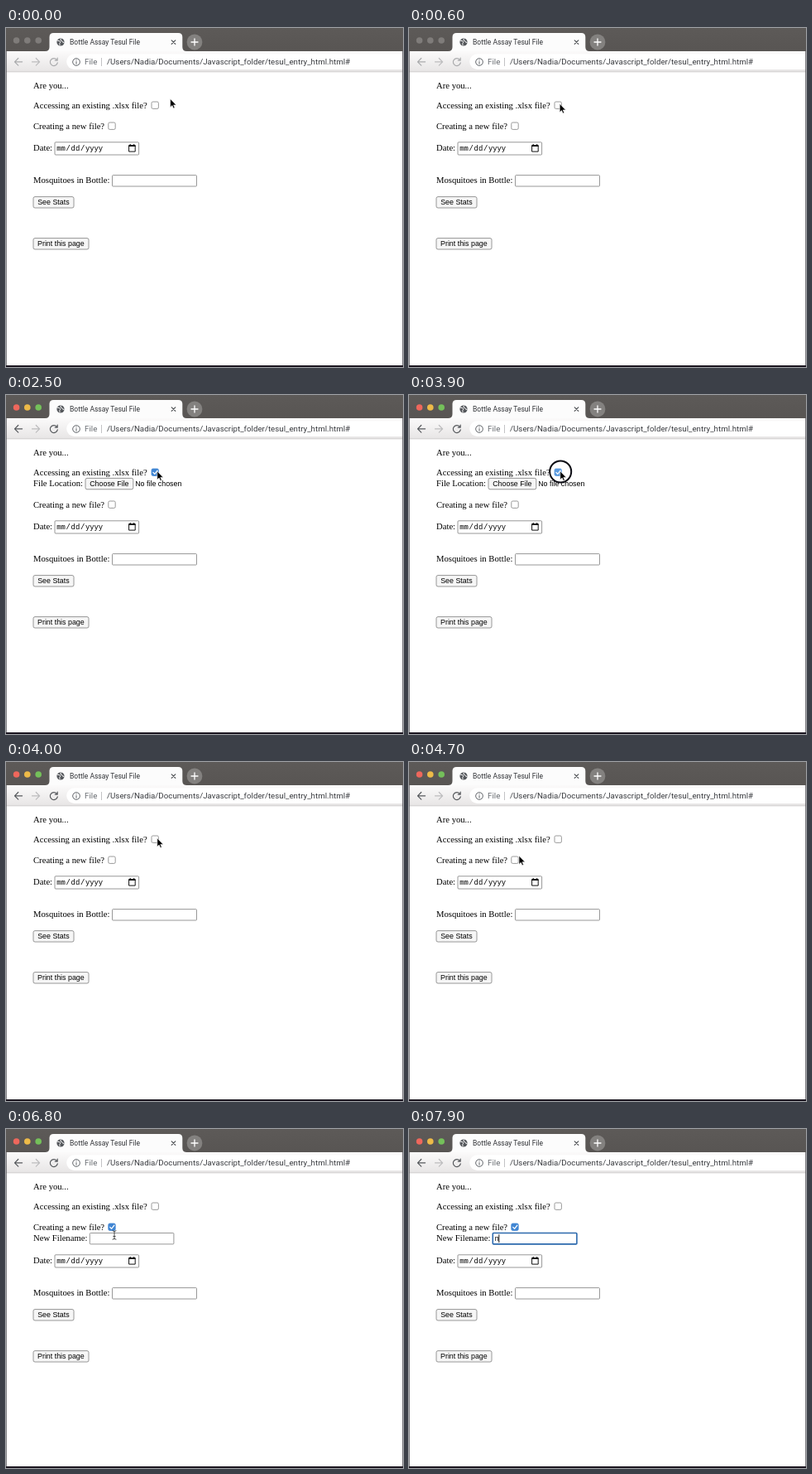
An HTML page for the animation above (8000 ms loop, 480 by 409 pixels).

```html
<!DOCTYPE html>
<html lang="en">
<head>
<meta charset="utf-8">
<title>Form demo</title>
<style>
  html, body { margin: 0; width: 100%; height: 100%; overflow: hidden; background: #fff; }
  svg { display: block; width: 480px; height: 409px; }
  text { white-space: pre; }
  .ui { font-family: Roboto, "Open Sans", sans-serif; }
  .serif { font: 10.67px "Liberation Serif", serif; }
  .arial { font: 8.89px "Liberation Sans", sans-serif; }
  .mono { font: 8.89px "Liberation Mono", monospace; }
  .field { fill: #fff; stroke: #767676; stroke-width: .75; }
  .button { fill: #f6f6f6; stroke: #767676; stroke-width: .75; }
  .line { fill: none; stroke-linecap: round; stroke-linejoin: round; }
</style>
</head>
<body>
<svg id="stage" viewBox="0 0 480 409" xmlns="http://www.w3.org/2000/svg">
  <defs>
    <linearGradient id="bar" x1="0" y1="0" x2="0" y2="1">
      <stop offset="0" stop-color="#5d5a58"/>
      <stop offset="1" stop-color="#585553"/>
    </linearGradient>
    <linearGradient id="tools" x1="0" y1="0" x2="0" y2="1">
      <stop offset="0" stop-color="#fbfafa"/>
      <stop offset="1" stop-color="#e7e5e5"/>
    </linearGradient>
  </defs>
  <rect width="480" height="409" fill="#fff"/>

  <!-- tab strip -->
  <rect width="480" height="28" fill="url(#bar)"/>
  <g id="lights">
    <circle cx="12.6" cy="15" r="3.8"/>
    <circle cx="25.8" cy="15" r="3.8"/>
    <circle cx="39.2" cy="15" r="3.8"/>
  </g>
  <path d="M47.5 28q5 0 5-5V11q0-5 5-5H208.3q5 0 5 5V23q0 5 5 5z" fill="#fcfcfc"/>
  <circle cx="66" cy="17" r="4.6" fill="#55585c"/>
  <path d="M62.4 15.2l2.2.4 1.2 1.6-1 1.2.2 2M66.3 13.3l-.4 1.6 1.8.7.9 1.6 1.4.2" class="line" stroke="#fcfcfc" stroke-width="1"/>
  <text class="ui" x="77" y="20" font-size="8.5" fill="#303236">Bottle Assay Tesul File</text>
  <path d="M200.2 14.8l4.6 4.6m0-4.6l-4.6 4.6" class="line" stroke="#45484c" stroke-width="1.1"/>
  <circle cx="228" cy="17" r="9.4" fill="#83817f"/>
  <path d="M224 17h8m-4-4v8" class="line" stroke="#fff" stroke-width="1.3"/>

  <!-- toolbar -->
  <rect y="28" width="480" height="25" fill="url(#tools)"/>
  <path d="M480 31.3H82.6a9.4 9.4 0 0 0 0 18.8H480z" fill="#fff"/>
  <rect y="52.5" width="480" height=".8" fill="#c9c8c8"/>
  <g id="nav" class="line" stroke-width="1.2">
    <path d="M19.6 40.8h-9m4.2-4.3l-4.3 4.3 4.3 4.3"/>
    <path d="M61.4 38.3a4.5 4.5 0 1 0 .9 3.6M62.2 36.2v2.9h-2.9"/>
  </g>
  <path d="M31.5 40.8h9m-4.2-4.3l4.3 4.3-4.3 4.3" class="line" stroke="#bcbcbd" stroke-width="1.2"/>
  <circle cx="85" cy="41" r="4.3" fill="none" stroke="#5f6368"/>
  <path d="M85 40.6v2.6m0-4.5v.2" class="line" stroke="#5f6368"/>
  <g class="ui" font-size="9.75">
    <text x="95" y="44.3" fill="#6a6e73">File</text>
    <text x="122" y="44.3" fill="#3a3c40">/Users/Nadia/Documents/Javascript_folder/tesul_entry_html.html#</text>
  </g>
  <rect x="115.2" y="36" width=".8" height="10" fill="#b4b5b7"/>

  <!-- page -->
  <text class="serif" x="33" y="73">Are you...</text>
  <text class="serif" x="33" y="97">Accessing an existing .xlsx file?</text>
  <g id="boxA"></g>
  <g id="existing">
    <text class="serif" x="33" y="110">File Location:</text>
    <rect class="button" x="96" y="100.4" width="57.8" height="13.4" rx="2"/>
    <text class="arial" x="101.2" y="110">Choose File</text>
    <text class="arial" x="156.2" y="110">No file chosen</text>
  </g>
  <g id="create">
    <text class="serif" x="33" y="122">Creating a new file?</text>
    <g id="boxB"></g>
  </g>
  <g id="fresh">
    <text class="serif" x="33" y="135">New Filename:</text>
    <rect id="nameField" x="101.3" y="125.5" width="101.6" height="13.4" rx="1"/>
    <text id="typed" class="arial" x="103.8" y="135">n</text>
    <rect id="caret" y="127.3" width=".9" height="9.8"/>
  </g>
  <g id="rest">
    <text class="serif" x="33" y="148">Date:</text>
    <rect class="field" x="59" y="137.8" width="101.6" height="15.2" rx="1"/>
    <g class="mono">
      <text x="61.2" y="148">mm</text><text x="72.6" y="148">/</text>
      <text x="78.6" y="148">dd</text><text x="89.9" y="148">/</text>
      <text x="95.9" y="148">yyyy</text>
    </g>
    <path d="M148.6 141.7h7.6v7.4h-7.6z" fill="none" stroke="#111"/>
    <path d="M148.2 142.3h8.4M150.3 140.3v1.4m4.3-1.4v1.4" stroke="#111" stroke-width="1.5"/>
    <text class="serif" x="33" y="187">Mosquitoes in Bottle:</text>
    <rect class="field" x="128.5" y="177.6" width="102" height="13.4" rx="1"/>
    <rect class="button" x="33" y="203.6" width="49" height="13.4" rx="2"/>
    <text class="arial" x="38.2" y="213">See Stats</text>
    <rect class="button" x="33" y="253.6" width="67" height="13.4" rx="2"/>
    <text class="arial" x="38" y="263">Print this page</text>
  </g>

  <!-- window edges -->
  <path d="M.4 28V409M479.6 28V409" stroke="#55535a" stroke-width=".8"/>
  <rect y="407" width="480" height="2" fill="#1d1822"/>

  <!-- pointer -->
  <circle id="ring" r="13" fill="none" stroke="#0c0c14" stroke-width="2"/>
  <path id="arrow" d="M-.4-.6V9.7L1.9 7.5 3.5 11 5.1 10.3 3.6 6.9H6.9z" fill="#000" stroke="#fff" stroke-width=".6"/>
  <path id="beam" d="M-2-5.2Q0-5.2 0-4Q0-5.2 2-5.2M0-4V4M-2 5.2Q0 5.2 0 4Q0 5.2 2 5.2M-1.2 1.6h2.4" class="line" stroke="#222" stroke-width=".8"/>
</svg>
<script>
const LOOP = 8000, STEP = 100, SHIFT = 14;
const $ = id => document.getElementById(id);
const set = (id, attrs) => {
  for (const k in attrs) $(id).setAttribute(k, attrs[k]);
};
const show = (id, on) => set(id, { visibility: on ? "visible" : "hidden" });
const move = (id, x, y) => set(id, { transform: `translate(${x} ${y})` });
const within = (t, a, b) => t >= a && t < b;

// time, x, y of the pointer tip
const path = [
  [0, 199, 86], [300, 199, 86], [600, 182.6, 92], [800, 182.6, 92],
  [1000, 183.2, 92.5], [4100, 183.2, 92.5], [4400, 160, 103],
  [4700, 133.4, 113.8], [5000, 128.6, 116], [6300, 128.6, 116],
  [6800, 131, 128], [LOOP, 131, 128]
];
const clicks = [[1600, 1800], [2200, 2400], [3800, 4000], [5400, 5800], [7000, 7100]];

function pointer(t) {
  const i = path.findIndex(p => p[0] > t);
  const [t0, x0, y0] = path[i - 1], [t1, x1, y1] = path[i];
  const u = (t - t0) / (t1 - t0), e = u * u * (3 - 2 * u);
  return [x0 + (x1 - x0) * e, y0 + (y1 - y0) * e];
}

function checkbox(id, x, y, on, pressed) {
  const fill = on ? (pressed ? "#5b9be0" : "#4186d3") : (pressed ? "#ececec" : "#fff");
  const tick = on
    ? `<path d="M${x + 1.9} ${y + 4.4}l1.9 2 3.3-4.2" class="line" stroke="#fff" stroke-width="1.3"/>` : "";
  $(id).innerHTML = `<rect x="${x}" y="${y}" width="8.4" height="8.4" rx="1.6" fill="${fill}" ` +
    `stroke="${on ? fill : "#808080"}" stroke-width=".8"/>` + tick;
}

function draw(time) {
  const t = Math.floor(time / STEP) * STEP;
  const active = t >= 1500;
  const existing = within(t, 2400, 4000), fresh = t >= 6000;
  const focused = t >= 7100, typed = t >= 7900;
  const pressed = clicks.some(([a, b]) => within(t, a, b));
  const [x, y] = pointer(t);

  const colors = active ? ["#ee675c", "#edba48", "#74c05a"] : Array(3).fill("#7f7c7a");
  [...$("lights").children].forEach((c, i) => c.setAttribute("fill", colors[i]));
  set("nav", { stroke: active ? "#55585c" : "#a9aaac" });

  checkbox("boxA", 176, 89, existing, pressed && within(t, 2200, 4000));
  checkbox("boxB", 123.8, 114, fresh, within(t, 5400, 6000));
  show("existing", existing);
  show("fresh", fresh);
  move("create", 0, existing ? SHIFT : 0);
  move("rest", 0, existing || fresh ? SHIFT : 0);

  set("nameField", {
    fill: "#fff",
    stroke: focused ? "#2c69ad" : "#767676",
    "stroke-width": focused ? 1.6 : .75
  });
  show("typed", typed);
  show("caret", typed || within(t, 7100, 7500));
  set("caret", { x: typed ? 108.4 : 103.4 });

  show("ring", pressed);
  move("ring", x, y);
  show("arrow", t < 6600);
  move("arrow", x, y);
  show("beam", t >= 6600 && !typed);
  move("beam", x, y);
}

const start = performance.now();
function tick(now) {
  draw(Math.max(0, now - start) % LOOP);
  requestAnimationFrame(tick);
}
draw(0);
requestAnimationFrame(tick);
</script>
</body>
</html>
```
